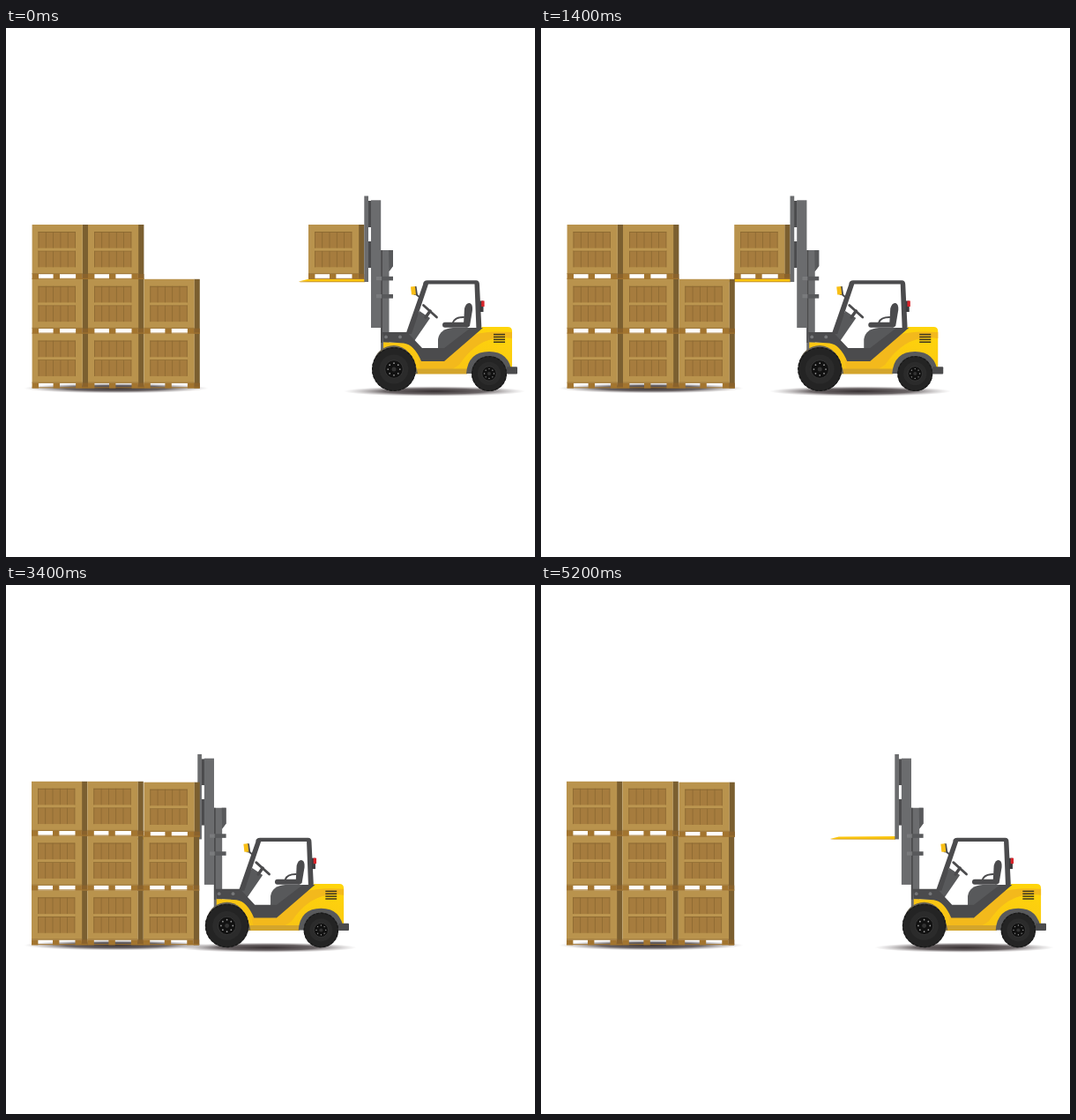
An HTML page for the animation above (6700 ms loop, 600 by 600 pixels).

```html
<!DOCTYPE html>
<html lang="en">
<head>
<meta charset="utf-8">
<title>Forklift</title>
<style>
html, body { margin: 0; width: 100%; height: 100%; overflow: hidden; background: #fff; }
svg { display: block; width: 100%; height: 100%; }
</style>
</head>
<body>
<svg id="stage" viewBox="0 0 600 600"></svg>
<script>
const LOOP = 6700, STEP = 100, SWAP = 3400;
const DARK = '#4b4b4d', MID = '#6b6c6e', GREY = '#58595b';

const rect = (x, y, w, h, fill, extra = '') =>
  `<rect x="${x}" y="${y}" width="${w}" height="${h}" fill="${fill}" ${extra}/>`;
const path = (d, fill) => `<path d="${d}" fill="${fill}"/>`;
const line = (d, stroke, width) =>
  `<path d="${d}" fill="none" stroke="${stroke}" stroke-width="${width}" stroke-linecap="round" stroke-linejoin="round"/>`;
const disc = (x, y, r, fill) => `<circle cx="${x}" cy="${y}" r="${r}" fill="${fill}"/>`;
const shadow = (x, y, rx, ry) =>
  `<ellipse cx="${x}" cy="${y}" rx="${rx}" ry="${ry}" fill="url(#shade)"/>`;

function panel(y) {
  let s = rect(7, y, 42.2, 18.8, '#a67c3e');
  for (let i = 0; i < 6; i++) s += rect(7 + i * 8.3, y, 0.8, 18.8, '#8c6932');
  return s + rect(7, y, 42.2, 0.9, '#8c6932');
}

function crate(x, y, id = '') {
  const feet = [0, 24, 49.5].map(fx => rect(fx, 56, 7.4, 6, '#a3752f')).join('');
  return `<g ${id && `id="${id}"`} transform="translate(${x} ${y})">
    ${rect(57, 0, 6.4, 62, '#7b5f30')}
    ${rect(0, 0, 57.2, 56, '#b9934d')}
    ${panel(8)}${panel(29.5)}
    ${rect(7, 26.8, 42.2, 2.8, '#bc9650')}
    ${rect(0, 55, 57.2, 1.2, '#a07a3c')}
    ${feet}${rect(56.8, 56, 6.6, 6, '#8a622b')}
    ${rect(0, 60.8, 63.4, 1, '#a3752f')}
  </g>`;
}

function wheel(x, y, r) {
  const hub = r * 0.41;
  let s = disc(x, y, r, '#242424') +
    `<circle cx="${x}" cy="${y}" r="${r - 0.7}" fill="none" stroke="#1a1a1a" stroke-width="1.4" stroke-dasharray="3 2"/>` +
    disc(x, y, r * 0.66, '#2b2b2b') + disc(x, y, hub, '#111') +
    `<circle cx="${x}" cy="${y}" r="${hub}" fill="none" stroke="#3c3c3c" stroke-width=".8"/>`;
  for (let i = 0; i < 8; i++) {
    const a = i * Math.PI / 4;
    s += disc(x + hub * 0.66 * Math.cos(a), y + hub * 0.66 * Math.sin(a), r * 0.035, '#999');
  }
  return s + disc(x, y, r * 0.1, '#333');
}

const fork =
  path('M332 287.6L342 285L407 284.6V288Z', '#fcc60f') +
  path('M332 287.8L342 287.2H407V288.2H334Z', '#c8901a');

const mast =
  rect(410.5, 196, 4, 30, DARK) + rect(410.5, 242, 4, 30, DARK) +
  rect(406.3, 190.5, 4.7, 97.5, MID) +
  path('M425 252H439V270L434.5 276V372H425Z', MID) +
  path('M434 252H439V270L434.5 276Z', GREY) +
  rect(425.2, 252, 1.8, 105, DARK) +
  rect(414, 195.3, 11.2, 144.7, MID) +
  [281.8, 302].map(y => rect(420, y, 19, 4.6, GREY) + rect(420, y, 6, 4.6, '#7a7b7d')).join('');

const cab =
  line('M507 334Q509 328 519 328', DARK, 2) +
  path('M519 336L520 318Q522 311 526 312Q529.5 313 529 320L526 338Q521 342 519 336Z', DARK) +
  path('M490 364V353Q492 341 507 340H531L512 364Z', GREY) +
  `<rect x="495" y="333.8" width="30" height="6" rx="3" fill="${DARK}"/>` +
  path('M469 321L481 329L461 358L453 349Z', GREY) +
  line('M481 321L476 328', DARK, 3.5) + line('M473.5 314.5L488.5 328', DARK, 2.8) +
  path('M473 291Q473 286.3 478 286.3H533Q537 286.3 537 291L539.5 343H533.5L531.5 290.5H479L460 347H453.5Z', DARK) +
  line('M465 302L470 306', DARK, 2) +
  path('M463 293H465.5L467 303H462.5Z', DARK) + path('M459 293.5L464 293L465 302.5H460Z', '#f9bf16') +
  rect(537.5, 309.5, 4, 12.5, '#3c3c3e') + rect(539.2, 309.5, 3.4, 6.5, '#d8232a');

const body =
  path('M428 356.5H453Q464 359 472 378H496L540 339H569Q574 339 574 344V386H523V392H466L440 372H428Z', 'url(#paint)') +
  path('M496 378L530 348Q545 343 574 345V352Q538 346 514 382L506 387H470L468 376Z', '#f3b91c') +
  path('M464 386.5H527L523 392.5H464Z', '#d3a52c') +
  path('M427 345H455L472 363H497L527 340H541L497 378H471Q463 359 451 357.5L428 356Z', DARK) +
  disc(431, 350.4, 1.9, '#77787a') + disc(447, 350.4, 1.9, '#77787a') +
  [346.8, 349.7, 352.6, 355.5].map(y => rect(553, y, 13, 1.5, '#3b3520')).join('') +
  path('M417 378Q422 361 440 360Q461 361 467 392H440Z', '#6a6454') +
  path('M522 392Q524 367 548 367Q571 367 574 392Z', GREY) +
  `<rect x="568" y="384.3" width="12" height="8.2" rx="1" fill="${DARK}"/>`;

const stack = [];
for (let row = 2; row >= 0; row--)
  for (let col = 0; col < 3; col++)
    if (row || col < 2) stack.push(crate(29.6 + col * 63.4, 223 + row * 61.8));

const stage = document.getElementById('stage');
stage.innerHTML = `
  <defs>
    <radialGradient id="shade">
      <stop offset="0" stop-color="#2c2426" stop-opacity=".95"/>
      <stop offset=".55" stop-color="#3a3234" stop-opacity=".75"/>
      <stop offset="1" stop-color="#8a8284" stop-opacity="0"/>
    </radialGradient>
    <linearGradient id="paint" x1="0" y1="1" x2="1" y2="0">
      <stop offset="0" stop-color="#f6bd18"/><stop offset="1" stop-color="#ffd60a"/>
    </linearGradient>
  </defs>
  ${shadow(125, 408.6, 105, 5.8)}
  <g id="truck">
    ${shadow(486, 412, 103, 5.8)}
    ${fork}${crate(343, 223, 'load')}
    ${cab}${mast}${body}
    ${wheel(440, 387, 25)}${wheel(548, 392, 20)}
  </g>
  <g id="stack">${stack.join('')}${crate(157, 223.9, 'placed')}</g>`;

const [truck, load, pile, placed] =
  ['truck', 'load', 'stack', 'placed'].map(id => document.getElementById(id));

// Reversing distance left to the parking spot: [time, offset]
const backing = [[3400, -184], [3900, -136], [4500, -68], [4700, -50.5], [5200, 0]];

function along(keys, t) {
  for (let i = 1; i < keys.length; i++) {
    const [t0, a] = keys[i - 1], [t1, b] = keys[i];
    if (t < t1) return a + (b - a) * (t - t0) / (t1 - t0);
  }
  return keys[keys.length - 1][1];
}

function draw(time) {
  const t = Math.floor((time % LOOP) / STEP) * STEP;
  const leaving = t >= SWAP;
  load.style.display = leaving ? 'none' : '';
  placed.style.display = leaving ? '' : 'none';
  pile.setAttribute('transform', leaving ? 'translate(-.6 -.2)' : '');
  truck.setAttribute('transform', leaving
    ? `translate(${401 + along(backing, t)} 330) scale(.9885 .99) translate(-406 -330)`
    : `translate(${-Math.min(189, t * 0.0884)} 0)`);
}

const start = performance.now();
function tick() {
  draw(performance.now() - start);
  requestAnimationFrame(tick);
}
tick();
</script>
</body>
</html>
```
